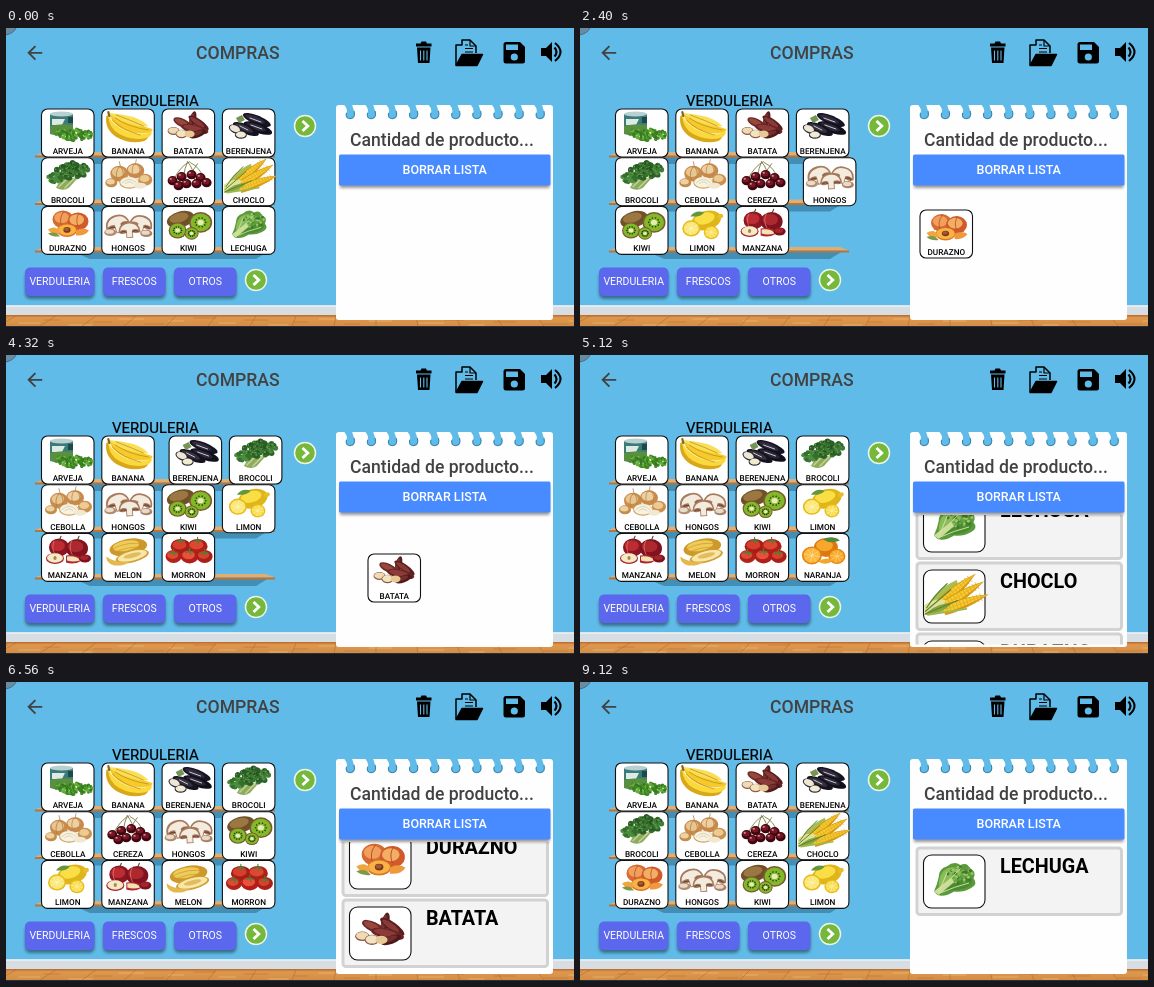
Animation, 568 px wide and 299 px high, one loop 9600 ms. Source, as an HTML page:

```html
<!DOCTYPE html>
<html lang="es">
<head>
<meta charset="utf-8">
<title>Compras</title>
<style>
  html, body { margin: 0; width: 100%; height: 100%; overflow: hidden; background: #60bbe8; }
  svg { display: block; width: 568px; height: 299px; font-family: Roboto, Arial, sans-serif; }
  .title { font-size: 17.6px; font-weight: 500; fill: #424242; }
  .label { font-size: 8.2px; font-weight: 500; text-anchor: middle; text-rendering: geometricPrecision; }
  .tab { font-size: 10.5px; fill: #fff; text-anchor: middle; }
  .name { font-size: 19.8px; font-weight: 700; }
  .card { fill: #fff; stroke: #111; stroke-width: 1.1; }
</style>
</head>
<body>
<svg viewBox="0 0 568 299">
  <defs>
    <linearGradient id="wood" x2="0" y2="1">
      <stop stop-color="#b9682a"/><stop offset=".25" stop-color="#dd9850"/><stop offset="1" stop-color="#d58d45"/>
    </linearGradient>
    <filter id="soft" x="-20%" y="-40%" width="140%" height="200%"><feGaussianBlur stdDeviation="1.6"/></filter>
    <clipPath id="view"><path d="M331 160H546V289.500H331Z"/></clipPath>
    <g id="next">
      <circle r="10.5" fill="#75b83b" stroke="#eef6e4" stroke-width="1.5"/>
      <path d="M-2.5 -5L2.8 0L-2.5 5" fill="none" stroke="#fff" stroke-width="2.8"/>
    </g>
  </defs>

  <path d="M0 0H568V299H0Z" fill="#60bbe8"/>
  <path d="M0 277.500H568V287H0Z" fill="#d6dde3"/>
  <path d="M0 278H568" stroke="#eef2f5" stroke-width="1.5"/>
  <path d="M0 287H568V298H0Z" fill="url(#wood)"/>
  <g id="planks"></g>
  <path d="M0 298.500H568" stroke="#26333c"/>
  <path d="M0 0H10Q8 5 0 7Z" fill="#698ca2"/>
  <path d="M10 0Q8 5 0 7" fill="none" stroke="#466c84"/>

  <path d="M20 11H7.830L13.420 5.410L12 4L4 12L12 20L13.410 18.590L7.830 13H20Z" fill="#424242" transform="translate(17.600 13.700) scale(.93)"/>
  <text class="title" x="190" y="31">COMPRAS</text>
  <g id="trash">
    <path d="M410 15.500H414.500L415.500 13.500H420L421 15.500H425.500V18.500H410ZM411 19.500H424.500L423.500 35H412Z"/>
    <path d="M414.500 22.500V32.500M417.800 22.500V32.500M421 22.500V32.500" stroke="#60bbe8" stroke-width="1.1"/>
  </g>
  <g id="folder" stroke="#000" stroke-width="1.5" stroke-linejoin="round">
    <path d="M450 37V17H456V12H464L470 18V25" fill="none"/>
    <path d="M464 12V18H470M459 17H462M459 20.500H467M459 24H467" fill="none" stroke-width="1.2"/>
    <path d="M450 37.500L456 26.500H476.500L471 37.500Z"/>
  </g>
  <g id="save">
    <path d="M500 14H514L519 19V33Q519 35.500 516.500 35.500H500Q497.500 35.500 497.500 33V16.500Q497.500 14 500 14Z"/>
    <path d="M500 16.500H512V22H500Z" fill="#60bbe8"/><circle cx="508.300" cy="29" r="3.600" fill="#60bbe8"/>
  </g>
  <g id="sound">
    <path d="M535 20H540L546 14V34L540 28H535Z"/>
    <path d="M548.500 19.500Q552.500 24 548.500 28.500M549 15Q560 24 549 33" fill="none" stroke="#000" stroke-width="2.1"/>
  </g>

  <text x="106" y="78" font-size="15" stroke="#000" stroke-width=".2">VERDULERIA</text>
  <g id="shelves"></g>
  <g id="tabs"></g>
  <use href="#next" x="299" y="98"/>
  <use href="#next" x="250" y="252"/>

  <path d="M333 77H544Q547 77 547 80V289Q547 292 544 292H333Q330 292 330 289V80Q330 77 333 77Z" fill="#fefefe"/>
  <g id="holes"></g>
  <text class="title" x="344" y="118">Cantidad de producto...</text>
  <g id="grid"></g>
  <g id="list" clip-path="url(#view)"></g>
  <path d="M334 130H543.500V160H334Z" opacity=".4" filter="url(#soft)"/>
  <rect x="333" y="126.500" width="211.500" height="31" rx="1.500" fill="#488aff"/>
  <text x="438.700" y="146.300" font-size="12.500" font-weight="500" fill="#fff" text-anchor="middle">BORRAR LISTA</text>
  <g id="drag"></g>
</svg>
<script>
const $ = id => document.getElementById(id);
const times = (n, f) => Array.from({ length: n }, (_, i) => f(i)).join('');
const el = (x, y, rx, ry, fill, rot = 0) =>
  `<ellipse rx="${rx}" ry="${ry}" fill="${fill}" transform="translate(${x.toFixed(1)} ${y.toFixed(1)}) rotate(${rot})"/>`;
const shape = (d, fill) => `<path d="${d}" fill="${fill}"/>`;
const line = (d, color, w = 1) => `<path d="${d}" fill="none" stroke="${color}" stroke-width="${w}" stroke-linecap="round"/>`;
const ball = (x, y, rx, ry, dark, light, rot = 0) =>
  el(x, y, rx, ry, dark, rot) + el(x - rx * .12, y - ry * .2, rx * .7, ry * .6, light, rot);
const dots = (n, cx, cy, rx, ry, r, colors) => {
  let seed = 12345;
  const rnd = () => (seed = seed * 16807 % 2147483647) / 2147483647;
  return times(n, i => {
    const a = rnd() * 6.283, q = Math.sqrt(rnd());
    return el(cx + Math.cos(a) * rx * q, cy + Math.sin(a) * ry * q, r, r, colors[i % colors.length]);
  });
};
const slice = (x, y, r, rind, flesh, rays) => el(x, y, r, r * .9, rind) + el(x, y, r * .83, r * .74, flesh) +
  times(8, i => {
    const a = i * Math.PI / 4 + .2;
    return line(`M${x} ${y}l${(Math.cos(a) * r * .75).toFixed(1)} ${(Math.sin(a) * r * .67).toFixed(1)}`, rays, .6);
  });
const cob = (x, y, rot) => `<g transform="translate(${x} ${y}) rotate(${rot})">` +
  shape('M-19 -4Q0 -6 21 0Q0 6 -19 4Z', '#d59a16') + shape('M-19 -3Q0 -5 19 0Q0 3 -19 2Z', '#f7cb2f') +
  times(11, i => line(`M${i * 3 - 16} -3v6`, '#d89d1a', .5)) + line('M-17 -.5H16', '#e0ab22', .5) + '</g>';
const kiwi = (x, y, r) => el(x, y, r, r * .9, '#7b5a2c') + el(x, y, r * .87, r * .77, '#83b82b') +
  times(10, i => el(x + Math.cos(i * .628) * r * .45, y + Math.sin(i * .628) * r * .4, .8, .8, '#26350f')) +
  el(x, y, r * .27, r * .23, '#e4ecb0');
const mushroom = (x, y, s, rot) => `<g transform="translate(${x} ${y}) rotate(${rot}) scale(${s})">` +
  shape('M-13 3Q-12 -9 0 -9Q12 -9 13 3Q9 6 4 4L4 10H-4L-4 4Q-9 6 -13 3Z', '#a87b5f') +
  shape('M-11 1Q-9 -7 0 -7Q9 -7 11 1Q6 -1 3 1L3 9H-3L-3 1Q-6 -1 -11 1Z', '#f4ebdf') +
  line('M-10 3Q-7 1 -4 3M10 3Q7 1 4 3', '#6b4634', 1.3) + '</g>';

// Each drawing is centred in a box of about 48 by 32.
const art = {
  ARVEJA: shape('M-18 -13H5V7Q-7 10 -18 7Z', '#3a7c77') + el(-6.5, -13, 11.5, 2.4, '#b9d0d2') +
    shape('M-16 -8H-3L-6 -2H-16Z', '#dfe9e6') + shape('M-18 -1Q-6 -4 5 -2V7H-18Z', '#58903f') +
    shape('M0 -10H5V-4H0Z', '#20474b') + dots(14, -10, 5, 7, 3, 1.6, ['#8cbf55', '#4c8c2e']) +
    dots(95, 7, 8, 18, 6, 1.6, ['#3f8a23', '#67ae39', '#357a1f']),
  BANANA: shape('M-20 -12Q-19 2 -2 9Q12 14 20 8Q21 11 16 14Q2 18 -12 10Q-24 2 -22 -11Z', '#d9a81a') +
    shape('M-20 -12Q-16 -1 0 5Q14 10 23 4Q25 8 18 11Q4 14 -9 7Q-20 1 -20 -12Z', '#fbd83b') +
    shape('M-19 -13Q-9 -8 3 -4Q15 -1 24 2Q25 5 18 6Q6 8 -6 2Q-17 -4 -19 -13Z', '#f5ca2a') +
    shape('M-19 -14Q-7 -13 5 -10Q14 -7 20 -1Q14 1 6 -2Q-8 -5 -19 -13Z', '#fade55') +
    line('M-16 -7Q-5 4 12 8M-13 -9Q0 0 20 3M-12 -12Q2 -7 15 -1', '#b98a18', .7) + line('M-20 -15l1 4', '#7b6a25', 2.2),
  BATATA: ball(4, -7, 9, 3.2, '#56211f', '#7c342d', -75) + ball(10, -4, 12, 3.8, '#5b1d20', '#883a36', 35) +
    ball(-6, -4, 10, 4.2, '#6b2b28', '#98483b', 25) + ball(6, 2, 14, 4.4, '#6c2526', '#8d3b38', 12) +
    ball(9, 7, 9, 3.4, '#4d1b1c', '#742f2c', -20) + el(-15, 4, 6, 4, '#8d5a48') + el(-15, 3.6, 5.2, 3.2, '#eedbb4') +
    el(-7, 7, 6, 4.2, '#8d5a48') + el(-7, 6.6, 5.2, 3.5, '#f3e4c0') + el(1, 7, 5, 3.4, '#e6c995'),
  BERENJENA: ball(8, -7, 15, 4.5, '#171422', '#302a3c', 22) + ball(9, 1, 15, 4.8, '#100f1a', '#2b2636', 20) +
    ball(-3, 2, 14, 4.6, '#15131d', '#35303e', 24) + line('M1 -9l11 4M2 -2l11 4M-9 -1l8 4', '#cbc9d1', 1) +
    shape('M-13 -9l6 -3 3 5 -6 3Z', '#759456') + el(-14, 2, 6.5, 4, '#30273b', 25) + el(-14, 1.7, 5.4, 3.2, '#ece7d2', 25) +
    el(-8, 8, 6, 3.8, '#30273b') + el(-8, 7.6, 5, 3, '#f1ebcf'),
  BROCOLI: shape('M-5 0L-12 12Q-5 16 1 12L9 3Z', '#8dab5b') + line('M-9 11L1 1M-3 12L7 2', '#c3d199', 1.5) +
    dots(70, 3, -5, 17, 8, 2.7, ['#2b5f26', '#407e36', '#356f2c']) + dots(30, -13, 2, 8, 5, 2.1, ['#33702b', '#4d8c3e']) +
    dots(60, 2, -6, 17, 8, .8, ['#659b4f', '#234f1f']),
  CEBOLLA: ball(-9, -2, 9, 8, '#c88c4e', '#e8c68f') + line('M-9 -14l1 4M-9 -9Q-14 -3 -11 4M-8 -9Q-3 -4 -6 3', '#b17f45', .8) +
    ball(7, -5, 9, 7.5, '#c78a4c', '#edd0a1') + line('M8 -16l-1 5M6 -12Q2 -6 5 1M9 -12Q14 -6 10 1', '#bd8a50', .8) +
    ball(17, 4, 7, 6, '#cb9151', '#ecca93') + el(1, 7, 10, 6, '#cfa664') + el(1, 6.6, 9, 5.2, '#f7f2e2') +
    line('M-6 7Q1 0 8 7M-3 8Q1 4 5 8', '#cdc6a0', .7) + ball(-17, 7, 6, 4.5, '#c48b4a', '#edd1a0') + el(12, 10, 6, 3, '#f0e8d0'),
  CEREZA: line('M-15 4Q-8 -10 1 -14M-5 1Q-4 -8 -1 -14M6 4Q5 -7 -1 -14M15 3Q12 -8 2 -13M2 -2L9 -12', '#7b7a3f', .9) +
    [[-16, 5], [-7, 1], [3, -1], [12, 2], [18, 7], [8, 8], [-2, 8], [-10, 10]].map(([x, y]) =>
      ball(x, y, 5, 4.6, '#3e0710', '#771522') + el(x - 1.8, y - 1.8, 1.2, .8, '#d9949a')).join(''),
  CHOCLO: shape('M-25 17Q-20 -2 2 -12L8 8Q-4 16 -25 17Z', '#a9bd55') + cob(2, -4, -40) + cob(7, 0, -32) + cob(9, 7, -20) +
    shape('M-25 9Q-16 2 -7 5Q-10 12 -25 17Z', '#dfe29a') + shape('M-25 17Q-15 7 -2 7Q-8 15 -25 17Z', '#86a53d') +
    line('M-24 14L-3 -4M-24 16L3 5M-23 11Q-16 0 -6 -9', '#5f8434', 1) + line('M-22 17L10 12', '#9fb851', 1.6),
  DURAZNO: ball(-5, -5, 10.500, 9, '#d66a33', '#f0a05a') + ball(10, -3, 10.500, 9, '#d15a2c', '#f2ae62') +
    line('M-4 -13Q-10 -6 -6 3M11 -11Q7 -6 10 2', '#bd4b26', .8) + el(-1, 6, 10, 6.500, '#dc7628') + el(-1, 5.5, 9, 5.500, '#f8b344') +
    ball(-1, 5.5, 3.6, 2.8, '#7b3620', '#a45a31') + shape('M-20 5Q-12 0 -8 8Q-14 13 -20 5Z', '#f0a53f') +
    shape('M8 6Q15 2 21 6Q17 12 8 11Z', '#ee9a3c') + shape('M-20 9Q-12 6 -8 12Q-15 13 -20 9Z', '#7d9a49'),
  HONGOS: mushroom(-11, -1, .95, -18) + mushroom(13, -1, .9, 15) + mushroom(1, 5, .85, -4) +
    ball(-18, 8, 6, 3.6, '#b28c70', '#eadbc9') + ball(18, 9, 6, 3.6, '#a98369', '#ead9c8'),
  KIWI: ball(-8, -5, 14, 8, '#705028', '#9b7742', -15) + kiwi(12, -2, 11.500) + kiwi(-11, 6, 9) + kiwi(3, 9, 7),
  LECHUGA: shape('M-17 10Q-14 4 -13 -2Q-13 -9 -6 -11Q0 -16 5 -12Q11 -15 13 -9Q19 -7 16 -1Q20 4 14 7Q7 11 0 10Q-8 15 -14 13Z', '#5a9a3a') +
    shape('M-13 6Q-13 -8 -3 -10Q4 -11 6 -5Q2 2 -3 6Z', '#8abd59') + shape('M-8 9Q0 -1 14 -2Q17 4 9 7Q2 10 -8 9Z', '#4a8a30') +
    dots(45, 4, -4, 11, 8, 1.2, ['#3f7a29', '#9cc768', '#66a543']) +
    shape('M-17 10Q-11 5 -3 -1L0 2L-13 13Z', '#cbdc96') + line('M-14 10Q-5 2 5 -9M-13 11L-6 -6M-11 11Q0 6 12 3', '#d4e2a6', .8),
  LIMON: ball(4, -4, 15, 9.500, '#dfb519', '#f9df45', -15) + el(18, -8, 3, 2.2, '#e6bf28', -30) +
    slice(-11, 4, 9, '#e8bb1c', '#fae675', '#fff7c1') + slice(9, 8, 7.500, '#e8bb1c', '#f8dc50', '#fff4af') +
    shape('M-12 -8Q-7 -15 2 -12Q-2 -7 -12 -8Z', '#65963b'),
  MANZANA: ball(-9, -4, 10, 9, '#8c1522', '#bd2c32') + ball(9, -3, 11, 9.500, '#811320', '#ae282f') +
    line('M-9 -10l2 -5M9 -10l2 -5', '#604127', 1.2) + line('M-14 -10Q-17 -3 -13 3M4 -11Q0 -5 4 3', '#e4796a', .8) +
    el(-13, 7, 9, 5.500, '#a8222c') + el(-13, 6.6, 8, 4.7, '#f4ebc6') + el(-13, 6.6, 1.6, 2, '#a98652') +
    shape('M-2 4Q10 2 14 9Q6 14 -2 11Z', '#b02630') + shape('M-1 5Q9 4 12 9Q5 11 -1 9Z', '#f3e4b4') + ball(17, 7, 6, 4, '#7c121f', '#a5252c'),
  MELON: ball(0, -4, 19, 8.500, '#cf982b', '#efcb57', -10) + line('M-17 -2Q0 -11 16 -7M-16 2Q0 -6 17 -4', '#c69c34', .7) +
    el(4, 5, 17, 6, '#d2a039', -14) + el(4, 4.5, 15, 4.7, '#f8e8a8', -14) + el(4, 4, 9, 2.3, '#e2bc60', -14) +
    shape('M-22 5Q-13 12 2 10Q-5 15 -14 14Q-22 12 -22 5Z', '#e4b84c'),
  MORRON: ball(-8, -5, 10, 7.500, '#a61d18', '#d93d2b') + ball(9, -5, 10, 7.500, '#af2018', '#dd4832') +
    ball(-15, 5, 8, 6.500, '#b1221b', '#e04a32') + ball(1, 5, 9, 7, '#b21e19', '#e8513a') + ball(16, 5, 8, 6.500, '#a91f19', '#d8422d') +
    [[-8, -11], [9, -11], [-15, 1], [1, 0], [16, 1]].map(([x, y]) =>
      line(`M${x - 4} ${y + 1}L${x} ${y}l4 1M${x} ${y}v-3M${x} ${y}l1 3`, '#4e7d34', 1.1)).join(''),
  NARANJA: ball(3, -4, 12, 9.500, '#db7812', '#f8a72d') + shape('M0 -12Q9 -17 17 -11Q8 -7 0 -12Z', '#538b35') +
    slice(-11, 4, 10, '#e4830f', '#fbb83e', '#ffe3a0') + slice(14, 5, 8.500, '#e4830f', '#f9a92d', '#ffdc8a') +
    shape('M-5 10Q4 15 10 9Q4 5 -5 10Z', '#f5a52b')
};

const names = Object.keys(art);
const picked = ['LECHUGA', 'CHOCLO', 'DURAZNO', 'CEREZA', 'BATATA'];
const kept = picked.filter(n => n !== 'CEREZA');
const colX = c => 35.500 + 60.300 * c, rowY = r => 81 + 48.700 * r;

const card = (name, x, y) => `<g transform="translate(${x} ${y})"><rect class="card" width="52.500" height="48" rx="6"/>
  <g transform="translate(26.500 18)">${art[name]}</g><text class="label" x="26.300" y="45">${name}</text></g>`;
const row = (name, y) => `<g transform="translate(336 ${y})">
  <rect x="1" y="1" width="204.500" height="66.500" rx="3" fill="#f3f3f3" stroke="#d2d2d2" stroke-width="3"/>
  <rect class="card" x="7.500" y="8" width="61.500" height="53" rx="8"/>
  <g transform="translate(38.300 32.500) scale(1.2)">${art[name]}</g><text class="name" x="84" y="25.500">${name}</text></g>`;

$('planks').innerHTML = times(24, i => line(`M${i * 25 - 12} ${290 + i * 5 % 8}h${14 + i * 7 % 12}`, i % 2 ? '#eab673' : '#c27a36', .8)) +
  times(14, i => line(`M${i * 42 - 8} 298L${i * 40 + 10} 288`, '#b56c2c', .6));
$('shelves').innerHTML = times(3, r => `<g transform="translate(0 ${r * 47.500})">
  <path d="M66 128H263L250 136H84Z" fill="#397fa3" opacity=".75"/>
  <path d="M38 124H260L269 127.500H29Z" fill="#e0ad72"/><path d="M29 127.500H269V129.500H29Z" fill="#b97539"/></g>`);
$('tabs').innerHTML = [['VERDULERIA', 19, 69.500], ['FRESCOS', 97, 62.500], ['OTROS', 168, 62.500]].map(([t, x, w]) =>
  `<rect x="${x}" y="243" width="${w}" height="28" rx="5" opacity=".4" filter="url(#soft)"/>
  <rect x="${x}" y="239.500" width="${w}" height="28.500" rx="5" fill="#5b67ed"/>
  <text class="tab" x="${x + w / 2}" y="257">${t}</text>`).join('');
$('holes').innerHTML = times(10, i => `<g transform="translate(${344 + i * 21.100} 86)">
  <path d="M-6 -9.500H2L4 -3Q6 4 0 4.800Q-6 4 -3 -3Q-3 -6 -6 -9.500Z" fill="#60bbe8"/>
  <path d="M4 -3Q6 4 0 4.800Q-5 4 -3.500 -1" fill="none" stroke="#3985ad" stroke-width="1.100"/></g>`);

// [start ms, rows in the list, scroll, dragged card x, y]
const scenes = [
  [0, 0, 0], [800, 0, 0, 240, 184], [960, 0, 0, 345, 194], [1120, 1, 0],
  [1600, 1, 0, 320, 169], [1760, 2, 0],
  [2240, 2, 0, 236, 142], [2400, 2, 0, 340, 182], [2560, 3, 0],
  [2880, 3, 0, 178, 139], [3040, 3, 0, 245, 162], [3200, 3, 0, 338, 186], [3360, 4, 0],
  [4000, 4, 0, 174, 92], [4160, 4, 0, 262, 144], [4320, 4, 0, 362, 199], [4480, 5, 0],
  [5120, 5, 29], [5280, 5, 88], [5440, 5, 148], [5600, 5, 202], [5760, 5, 232],
  [6400, 4, 175], [6560, 4, 161], [7680, 3, 90], [8320, 2, 30], [8480, 2, 19], [8960, 1, 6], [9120, 1, 0]
];

function draw([start, count, scroll, x, y]) {
  const list = (start < 6400 ? picked : kept).slice(0, count);
  const held = x === undefined ? null : picked[count];
  const overList = held && x > 300;
  const page = names.filter(n => !list.includes(n)).slice(0, 12);
  const gap = overList ? page.indexOf(held) : -1;
  if (overList) page.splice(gap, 1);
  $('grid').innerHTML = page.map((n, i) => {
    if (n === held) return '';
    const c = i % 4, r = i >> 2;
    const push = overList && i >= gap && r === gap >> 2 ? 7 : 0;
    return card(n, colX(c) + push, rowY(r));
  }).join('');
  $('list').innerHTML = overList ? '' : list.map((n, i) => row(n, 165 + i * 71 - scroll)).join('');
  $('drag').innerHTML = held ? card(held, x, y) : '';
}

let shown;
function tick() {
  const t = performance.now() % 9600;
  const scene = scenes.findLast(s => s[0] <= t);
  if (scene !== shown) draw(shown = scene);
  requestAnimationFrame(tick);
}
tick();
</script>
</body>
</html>
```
